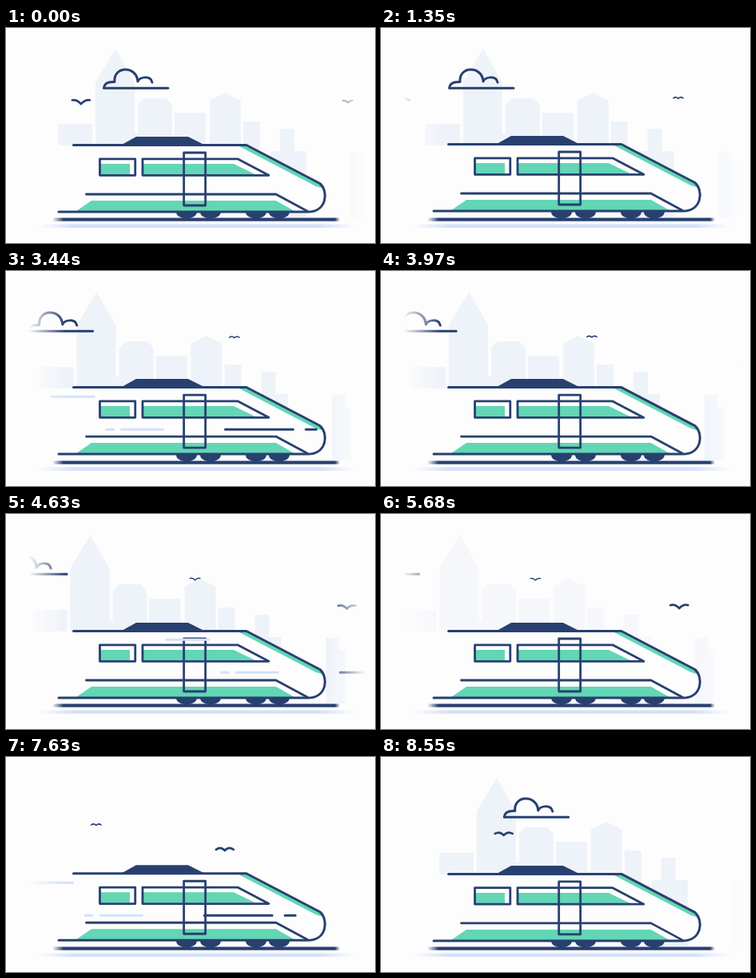
These frames come from a looping animation (462 px wide and 269 px high, 8.57 s). An HTML page with a canvas:

```html
<!DOCTYPE html>
<html lang="en">
<head>
<meta charset="utf-8">
<title>Express train</title>
<style>
html, body { margin: 0; width: 100%; height: 100%; overflow: hidden; background: #fdfdfd; }
canvas { display: block; width: 462px; height: 269px; }
</style>
</head>
<body>
<canvas id="stage" width="462" height="269"></canvas>
<script>
const W = 462, H = 269, LOOP = 8570;
const NAVY = '#28406f', GREEN = '#62d6b5', PALE = '#d5e0fa', CITY = '#eef2f9', PAPER = '#fdfdfd';
const CUT = 8200;            // the scene restarts here
const LEAD = 9710;           // loop time that lines up with scene time zero after the cut
const BEAT = 521;            // period of the body bounce and the wing beat

const ctx = document.getElementById('stage').getContext('2d');
const layer = document.createElement('canvas');
layer.width = W;
layer.height = H;
const lc = layer.getContext('2d');

const wave = t => Math.cos(2 * Math.PI * (t / BEAT - 0.58));
const clamp = v => Math.max(0, Math.min(1, v));

function poly(c, pts, color) {
  c.fillStyle = color;
  c.beginPath();
  pts.forEach(([x, y]) => c.lineTo(x, y));
  c.closePath();
  c.fill();
}

function stroke(c, d, color, width) {
  c.strokeStyle = color;
  c.lineWidth = width;
  c.lineCap = c.lineJoin = 'round';
  c.stroke(new Path2D(d));
}

function fadeX(c, color, x0, x1, in0, in1) {
  const g = c.createLinearGradient(x0, 0, x1, 0);
  const span = x1 - x0;
  g.addColorStop(0, color + '00');
  g.addColorStop(in0 / span, color + 'ff');
  g.addColorStop(1 - in1 / span, color + 'ff');
  g.addColorStop(1, color + '00');
  return g;
}

// Draws on a separate layer whose left and right edges dissolve.
function masked(draw) {
  lc.clearRect(0, 0, W, H);
  draw(lc);
  lc.globalCompositeOperation = 'destination-in';
  lc.fillStyle = fadeX(lc, '#000000', 28, 450, 46, 50);
  lc.fillRect(0, 0, W, H);
  lc.globalCompositeOperation = 'source-over';
  ctx.drawImage(layer, 0, 0);
}

function at(c, x, y, draw) {
  c.save();
  c.translate(x, y);
  draw();
  c.restore();
}

function city(c) {
  const box = (x, y, r, b = 147) => poly(c, [[x, y], [r, y], [r, b], [x, b]], CITY);
  box(65, 120, 108);
  poly(c, [[112, 147], [112, 68], [137, 26], [161, 68], [161, 147]], CITY);
  box(161, 132, 165);
  poly(c, [[165, 147], [165, 96], [173, 88], [200, 88], [208, 96], [208, 147]], CITY);
  box(211, 106, 250);
  poly(c, [[255, 147], [255, 91], [274, 81], [294, 91], [294, 147]], CITY);
  box(297, 117, 318, 160);
  box(331, 154, 376, 237);
  box(343, 126, 361, 154);
  box(432, 155, 448, 237);
  box(448, 170, 456, 237);
}

function cloud(c) {
  stroke(c, 'M203 75.2H122.5C123 69 129 67 136 67.5C134 47 164 47 165 67C167 61 181 59 183 68', NAVY, 3);
}

function bird(c, x, y, size, t) {
  const tip = 2 * wave(t) - 0.5;
  at(c, x, y, () => {
    c.scale(size, size);
    stroke(c, `M-11 ${tip}Q-5 -3 0 2.5Q5 -3 11 ${tip}`, NAVY, 2.7);
  });
}

function scenery(t, s) {
  masked(c => {
    c.globalAlpha = s < 0 ? 1 : 1 - clamp((t - 5000) / 1400);
    at(c, -6.8 * s, 0, () => city(c));
    c.globalAlpha = 1;
    at(c, -27.4 * s, 0, () => cloud(c));
    bird(c, 94 - 51.5 * s, 92.5 - 2.5 * s, 1, t);
    bird(c, 428 - 41.3 * s, 81.2 + 10.8 * (1 - s / 5) ** 2, 0.56, t);
    bird(c, 427 - 51 * (s - 4.63), 116 - 0.5 * (s - 4.63), 1, t);
  });
}

function track() {
  ctx.fillStyle = fadeX(ctx, PALE, 40, 437, 45, 45);
  ctx.fillRect(40, 245.5, 397, 4.5);
  ctx.fillStyle = fadeX(ctx, NAVY, 58, 418, 14, 6);
  ctx.fillRect(58, 237.5, 360, 4.2);
}

function wheels() {
  ctx.fillStyle = NAVY;
  for (const x of [226, 256, 313, 342]) {
    ctx.beginPath();
    ctx.ellipse(x, 230, 13, 8.5, 0, 0, Math.PI);
    ctx.fill();
  }
}

function train() {
  const nose = 'L393 194.5C404 204 402 230 378 230';
  ctx.fillStyle = PAPER;
  ctx.fill(new Path2D('M84 146.5H301' + nose + 'H66Z'));
  poly(ctx, [[290, 147], [301, 147], [395, 196], [398, 201], [388, 198]], GREEN);
  poly(ctx, [[88, 229], [107, 216], [338, 216], [361, 229]], GREEN);
  poly(ctx, [[118, 170], [155, 170], [155, 183], [118, 183]], GREEN);
  poly(ctx, [[172, 170], [285, 170], [312, 183], [172, 183]], GREEN);
  poly(ctx, [[144, 146.5], [163, 136], [228, 136], [249, 146.5]], NAVY);
  stroke(ctx, 'M84.5 146.5H301' + nose + 'H66', NAVY, 3);
  stroke(ctx, 'M100.5 208H338L377 229', NAVY, 2.8);
  stroke(ctx, 'M117.5 163.8H161.8V184.3H117.5Z', NAVY, 2.8);
  stroke(ctx, 'M171 163.8H290L329 184.3H171Z', NAVY, 2.8);
  stroke(ctx, 'M222.7 156H249.7V222H222.7Z', NAVY, 2.8);
}

// One gust of wind: a rigid set of dashes sweeping to the left.
const GUSTS = [224, 1614, 3005, 4387, 5772, 7160];

function wind(t) {
  if (t >= CUT) return;
  masked(c => {
    for (const start of GUSTS) {
      const x = 600 - 0.75 * (t - start);
      if (t < start || x < -150) continue;
      at(c, x, 0, () => {
        stroke(c, 'M1.5 198.3H86.5M102.5 198.3H115.5', NAVY, 3);
        stroke(c, 'M-147.5 198.3H-138.5M-128.5 198.3H-76.5M-216.5 157.3H-163', PALE, 3);
      });
    }
  });
}

function render(now) {
  const t = now % LOOP;
  const s = (t < CUT ? t : t - LEAD) / 1000;
  ctx.fillStyle = PAPER;
  ctx.fillRect(0, 0, W, H);
  scenery(t, s);
  track();
  wheels();
  at(ctx, 0, -(Math.max(0, wave(t)) ** 3), train);
  wind(t);
}

const begin = performance.now();
function tick() {
  render(performance.now() - begin);
  requestAnimationFrame(tick);
}
tick();
</script>
</body>
</html>
```
